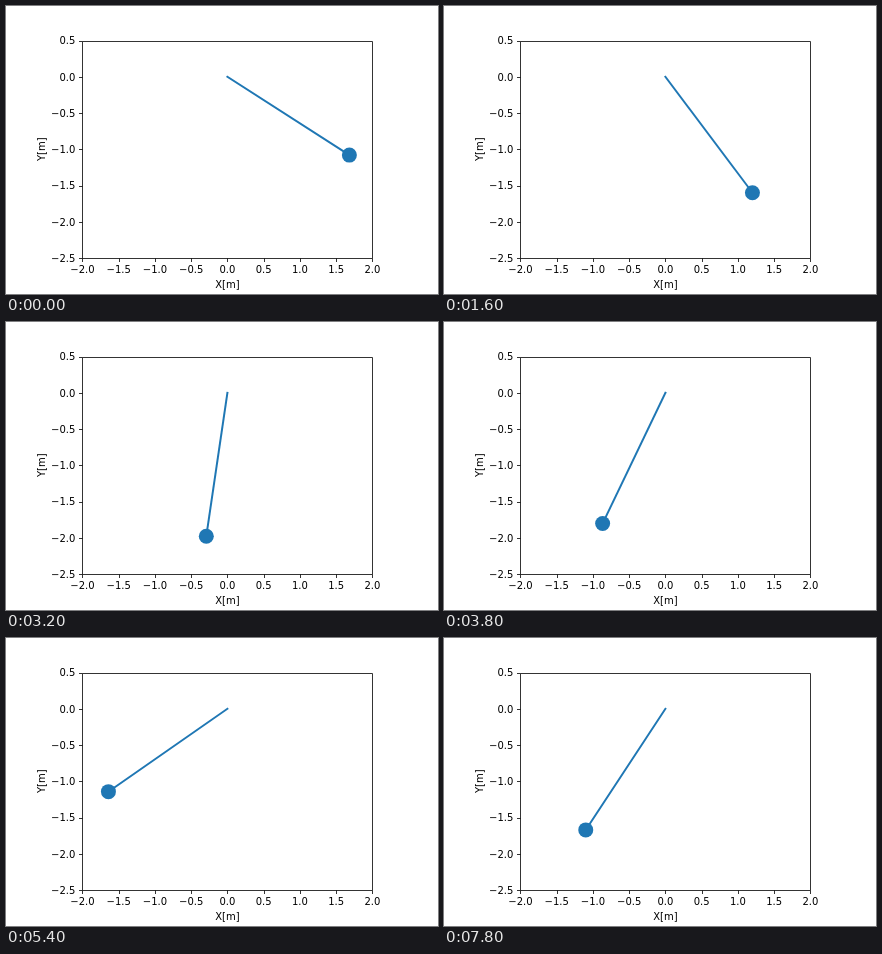
Animation of 432 by 288 pixels, one loop 8000 ms. Source, as an HTML page:

```html
<!DOCTYPE html>
<html lang="en">
<head>
<meta charset="utf-8">
<title>Pendulum</title>
<style>
  html, body { margin: 0; width: 100%; height: 100%; overflow: hidden; background: #fff; }
  svg { display: block; width: 432px; height: 288px; }
  text { font: 10px "DejaVu Sans", sans-serif; fill: #000; }
  .axes { fill: none; stroke: #000; stroke-width: 0.8; }
  #rod { stroke: #1f77b4; stroke-width: 2; stroke-linecap: square; }
  #bob { fill: #1f77b4; }
</style>
</head>
<body>
<svg viewBox="0 0 432 288">
  <line id="rod"/>
  <circle id="bob" r="7.5"/>
  <g id="plot"></g>
</svg>
<script>
const SCALE = 72.48, PIVOT_X = 221.4, PIVOT_Y = 70.8;
const STEP_MS = 200, STEPS = 40;
const GRAVITY = 9.81, LENGTH = 2, DT = 0.05;

const toX = m => PIVOT_X + m * SCALE;
const toY = m => PIVOT_Y - m * SCALE;
const crisp = v => Math.round(v) + 0.5;
const rod = document.getElementById('rod');
const bob = document.getElementById('bob');
const plot = document.getElementById('plot');

function add(tag, attrs, content = '') {
  const el = document.createElementNS('http://www.w3.org/2000/svg', tag);
  setAttrs(el, attrs);
  el.textContent = content;
  plot.append(el);
}

function setAttrs(el, attrs) {
  for (const key in attrs) el.setAttribute(key, attrs[key]);
}

function drawAxes() {
  const left = crisp(toX(-2)), right = crisp(toX(2));
  const top = crisp(toY(0.5)), bottom = crisp(toY(-2.5));
  const label = v => v.toFixed(1).replace('-', '\u2212');
  let path = `M${left} ${top}H${right}V${bottom}H${left}Z`;

  for (let v = -2; v <= 2; v += 0.5) {
    path += `M${crisp(toX(v))} ${bottom}v3.5`;
    add('text', { x: toX(v), y: 267, 'text-anchor': 'middle' }, label(v));
  }
  for (let v = -2.5; v <= 0.5; v += 0.5) {
    path += `M${left} ${crisp(toY(v))}h-3.5`;
    add('text', { x: 69.4, y: Math.round(toY(v) + 3.8), 'text-anchor': 'end' }, label(v));
  }
  add('path', { class: 'axes', d: path });
  add('text', { x: PIVOT_X, y: 282, 'text-anchor': 'middle' }, 'X[m]');
  add('text', { transform: `translate(39 ${toY(-1)}) rotate(-90)`, 'text-anchor': 'middle' }, 'Y[m]');
}

// Semi-implicit Euler, released at rest from 1 rad.
function swing() {
  const angles = [];
  let angle = 1, speed = 0;
  for (let i = 0; i < STEPS; i++) {
    angles.push(angle);
    speed -= GRAVITY / LENGTH * Math.sin(angle) * DT;
    angle += speed * DT;
  }
  return angles;
}

const angles = swing();

function draw(now) {
  const angle = angles[Math.floor(now / STEP_MS) % STEPS];
  const x = toX(LENGTH * Math.sin(angle));
  const y = toY(-LENGTH * Math.cos(angle));
  setAttrs(rod, { x1: PIVOT_X, y1: PIVOT_Y, x2: x, y2: y });
  setAttrs(bob, { cx: x, cy: y });
}

let start;
function tick(now) {
  start ??= now;
  draw(now - start);
  requestAnimationFrame(tick);
}

drawAxes();
draw(0);
requestAnimationFrame(tick);
</script>
</body>
</html>
```
